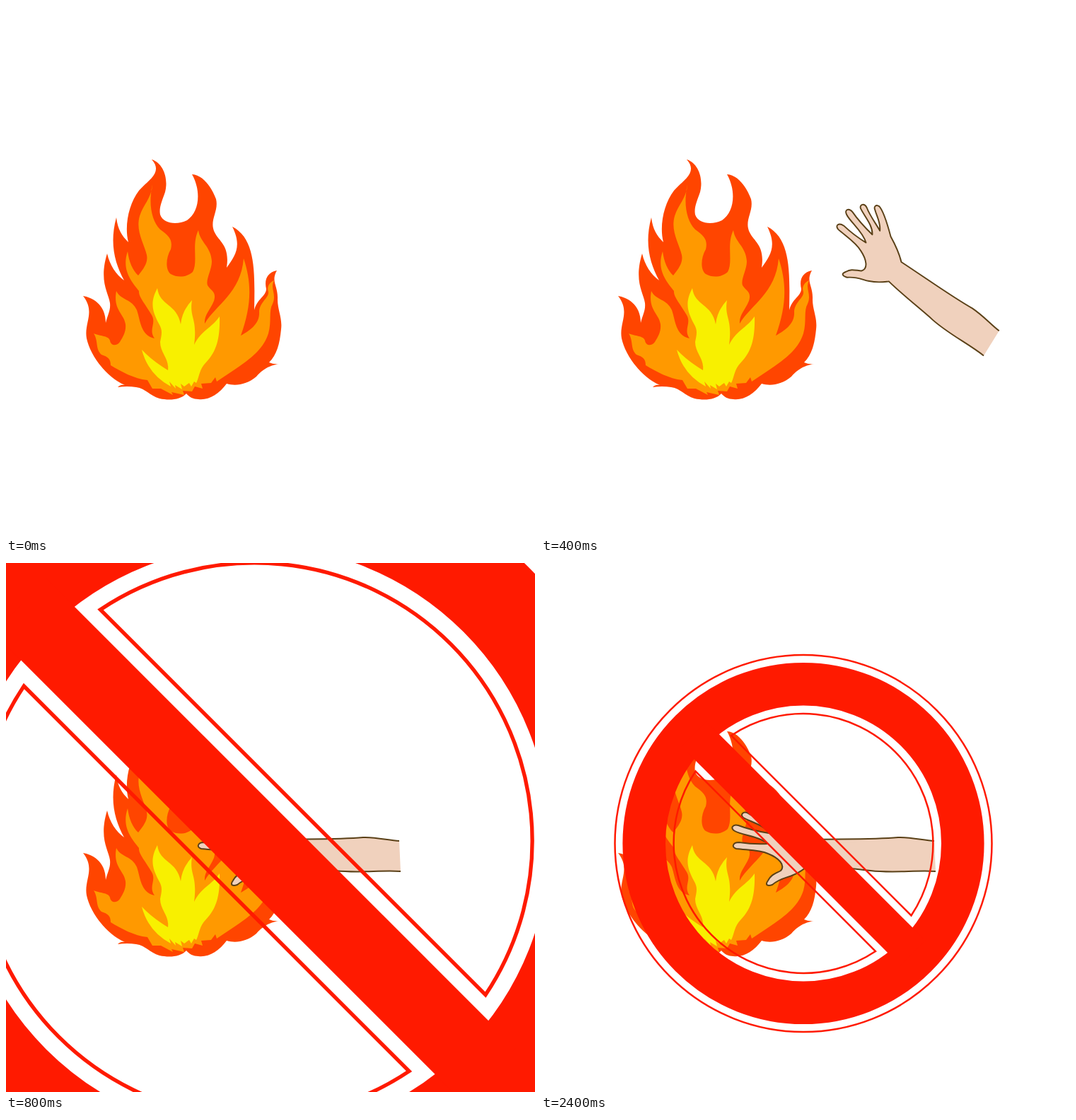
An HTML page that plays this animation: 748x748 px, repeating every 3200 ms.

```html
<!DOCTYPE html>
<html lang="en">
<head>
<meta charset="utf-8">
<title>Do not touch fire</title>
<style>
  html, body { margin: 0; width: 100%; height: 100%; overflow: hidden; background: #fff; }
  svg { display: block; width: 100%; height: 100%; }
  #arm { fill: #f0d1bd; stroke: #5a4017; stroke-width: 2; stroke-linejoin: round; }
  #sign { fill: none; stroke: #ff1a00; }
  .thin { stroke-width: 2.5; }
</style>
</head>
<body>
<svg viewBox="0 0 748 748">
  <g id="fire">
    <path fill="#ff4500" d="M109 410C121 412 141 421 141 448C144 436 148 431 147 420C145 405 131 390 143 350
      C147 367 155 379 167 388C154 364 146 336 156 299C158 316 164 325 173 334C167 310 174 279 188 261
      C200 247 223 236 206 217C222 222 230 243 225 263C221 275 216 285 218 295C222 308 242 310 256 303
      C274 291 276 261 263 238C279 239 291 257 297 273C301 290 288 302 294 318C300 333 317 337 312 370
      C324 353 334 340 320 312C353 329 352 375 351 430C355 414 368 410 368 400C365 387 369 377 383 374
      C374 390 385 395 384 415C384 430 391 441 389 457C387 478 383 493 372 504Q379 507 386 506
      C369 509 361 516 354 524C341 535 325 538 312 534C301 549 286 558 272 556C265 556 259 553 255 548
      C247 557 231 558 217 555C203 551 198 541 184 539Q171 537 158 539Q162 535 168 536
      C142 525 119 494 114 470C110 448 127 433 109 410Z"/>
    <path fill="#ff9900" d="M124 463C133 467 145 466 147 473C148 480 156 482 161 475C166 467 170 460 169 450
      C167 435 151 430 156 403C162 416 178 414 185 430C190 444 190 466 210 470C201 457 213 449 206 437
      C197 421 187 411 188 403C178 390 163 374 172 347C174 362 179 374 187 381C196 370 201 362 199 352
      C195 335 183 318 189 297C194 281 206 271 207 253C201 280 206 304 218 316C231 325 236 331 233 344
      C226 356 225 373 233 379C243 385 257 383 264 376C272 361 262 338 272 317C274 334 290 340 291 361
      C291 373 282 387 285 395C290 403 298 404 294 417C288 431 280 437 281 449C297 422 332 406 336 357
      C348 393 347 424 332 466C348 457 359 448 358 432C359 418 372 413 371 404C368 396 374 390 379 388
      C373 400 383 407 377 421C371 431 376 446 371 463C362 493 328 510 298 531L296 525L290 533L276 534
      L278 541L267 538L263 545L250 544L252 550L234 546L236 550L219 541L207 541L200 529
      C181 527 163 517 148 508C148 499 144 496 135 493C126 485 131 474 124 463Z"/>
    <path fill="#f8f000" d="M192 486Q207 502 229 515C231 498 218 491 218 475C220 464 222 459 216 449
      C206 430 204 418 214 399C217 424 242 421 247 450Q249 431 263 416C259 442 271 440 266 479
      C276 459 291 455 302 439C303 474 296 491 281 506C273 515 273 526 269 533L266 531L262 538L259 533
      L252 538L247 534L249 542L239 536L240 541L231 531L233 538Q201 521 192 486Z"/>
  </g>
  <path id="arm" d="M556 393C540 392 525 388 505 388C470 391 430 390 380 391C370 382 356 374 346 369
    C332 357 316 344 307 342C301 342 300 347 305 350C312 356 322 360 328 371C318 366 303 361 293 354
    C286 350 281 356 286 360C296 366 315 370 322 382C310 380 292 376 279 371C271 369 267 375 274 379
    C284 385 308 386 321 397C306 398 293 397 280 395C271 395 269 402 276 404C291 406 308 405 321 411
    C336 417 346 427 339 435C330 440 325 441 321 449C316 456 321 457 327 455C339 445 349 445 357 441
    C369 436 374 431 381 425C410 430 445 432 466 435C498 439 530 434 558 436"/>
  <g id="sign">
    <circle class="thin" r="266.5"/>
    <circle r="225.3" stroke-width="60.6"/>
    <path d="M-155-155L155 155" stroke-width="50"/>
    <path id="half" class="thin" d="M-102-152.5A183.5 183.5 0 0 1 152.5 102Z"/>
    <use href="#half" transform="rotate(180)"/>
  </g>
</svg>
<script>
  const arm = document.getElementById("arm");
  const sign = document.getElementById("sign");
  const STEP = 200, LOOP = 3200;

  // Wrist x, wrist y, turn in degrees, scale
  const armPoses = [null, [547.5, 364, 60.2, .927], [500.5, 375, 34.5, .961], [380, 407.5, 0, 1]];
  // Centre x, centre y, scale
  const signPoses = [[351.7, 392.3, 2.14], [358.3, 374.5, 1.435], [371, 396.5, 1]];

  function place(el, pose, transform) {
    el.style.display = pose ? "" : "none";
    if (pose) el.setAttribute("transform", transform(...pose));
  }

  function draw() {
    const step = Math.min(6, Math.floor(performance.now() % LOOP / STEP));
    place(arm, armPoses[Math.min(step, 3)], (x, y, turn, size) =>
      `translate(${x} ${y}) rotate(${turn}) scale(${size}) translate(-380 -407.5)`);
    place(sign, signPoses[step - 4], (x, y, size) => `translate(${x} ${y}) scale(${size})`);
    requestAnimationFrame(draw);
  }
  draw();
</script>
</body>
</html>
```
